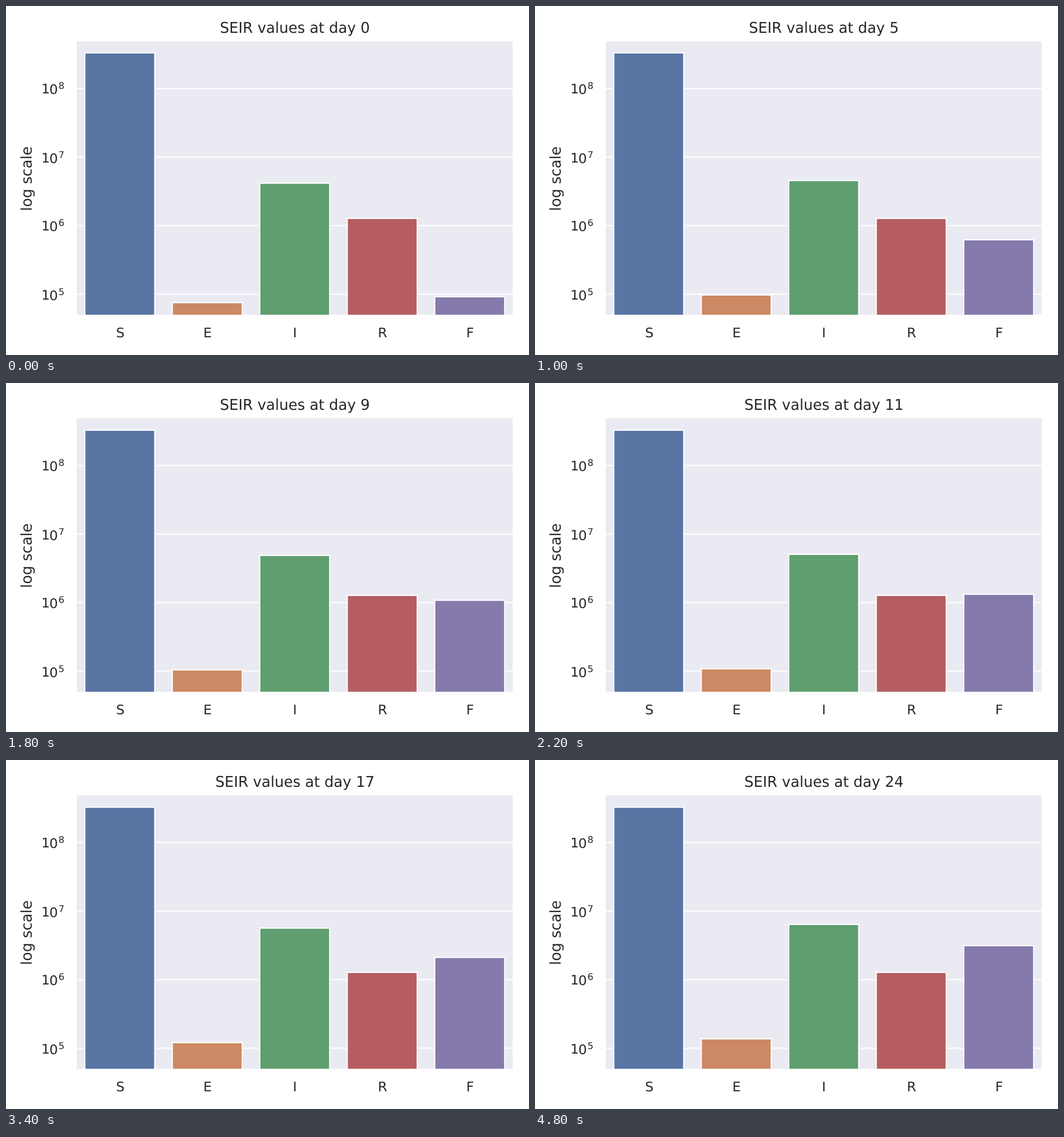
Recreate the animation shown at these times as a matplotlib script. Size 917 by 611 pixels, loop 5 s.

```python
import matplotlib.pyplot as plt
from matplotlib.animation import FuncAnimation

WIDTH, HEIGHT, DPI = 917, 611, 153.8
LEFT, RIGHT, TOP, BOTTOM = 122.8, 889.7, 60.6, 541.9
DAYS = 25
GROWTH = 1.01806  # daily factor of the infection
INK = "#262626"
LABELS = "SEIRF"
COLORS = ["#5875A4", "#CC8963", "#5F9E6E", "#B55D60", "#857AAB"]

plt.rcParams.update({
    "font.family": "DejaVu Sans",
    "text.hinting": "no_hinting",
    "text.color": INK, "axes.labelcolor": INK,
    "xtick.color": INK, "ytick.color": INK,
    "axes.titlesize": 12, "axes.labelsize": 12,
    "xtick.labelsize": 11, "ytick.labelsize": 11,
    "axes.facecolor": "#EAEAF2", "axes.edgecolor": "white",
    "axes.linewidth": 1.25, "axes.axisbelow": True,
})


def exponent_at(y):
    """Power of ten shown at a pixel row."""
    return 8 + (144.5 - y) / 120


def values(day):
    """Compartment sizes S, E, I, R and F on the given day."""
    rise = GROWTH ** day
    susceptible = 3.314e8 if day < 6 else 3.28e8
    exposed = 8.89e4 * rise * (1 - 0.153 * 0.06 ** day)
    infected = 4.16e6 * rise
    recovered = 1.276e6
    fatal = 9.17e4 + 0.0246 * 4.16e6 * (rise - 1) / (GROWTH - 1)
    return susceptible, exposed, infected, recovered, fatal


fig = plt.figure(figsize=((WIDTH + 0.01) / DPI, (HEIGHT + 0.01) / DPI),
                 dpi=DPI, facecolor="white")
ax = fig.add_axes([LEFT / WIDTH, 1 - BOTTOM / HEIGHT,
                   (RIGHT - LEFT) / WIDTH, (BOTTOM - TOP) / HEIGHT])
ax.set_yscale("log")
bars = ax.bar(range(5), values(0), width=0.8, bottom=1, color=COLORS,
              edgecolor="white", linewidth=1, snap=False)
ax.set_xlim(-0.5, 4.5)
ax.set_ylim(10 ** exponent_at(BOTTOM), 10 ** exponent_at(TOP))
ax.set_xticks(range(5), LABELS)
ax.set_ylabel("log scale")
ax.tick_params(which="both", left=False, bottom=False)
ax.tick_params(which="major", length=6, pad=3.5)
ax.grid(axis="y", color="white", linewidth=1, snap=False)
for spine in ax.spines.values():
    spine.set_snap(False)
title = ax.set_title("", pad=6)


def update(day):
    for bar, value in zip(bars, values(day)):
        bar.set_height(value)
    title.set_text(f"SEIR values at day {day}")
    return [*bars, title]


anim = FuncAnimation(fig, update, frames=DAYS, interval=200,
                     repeat=True, repeat_delay=0, blit=False)
plt.show()
```
